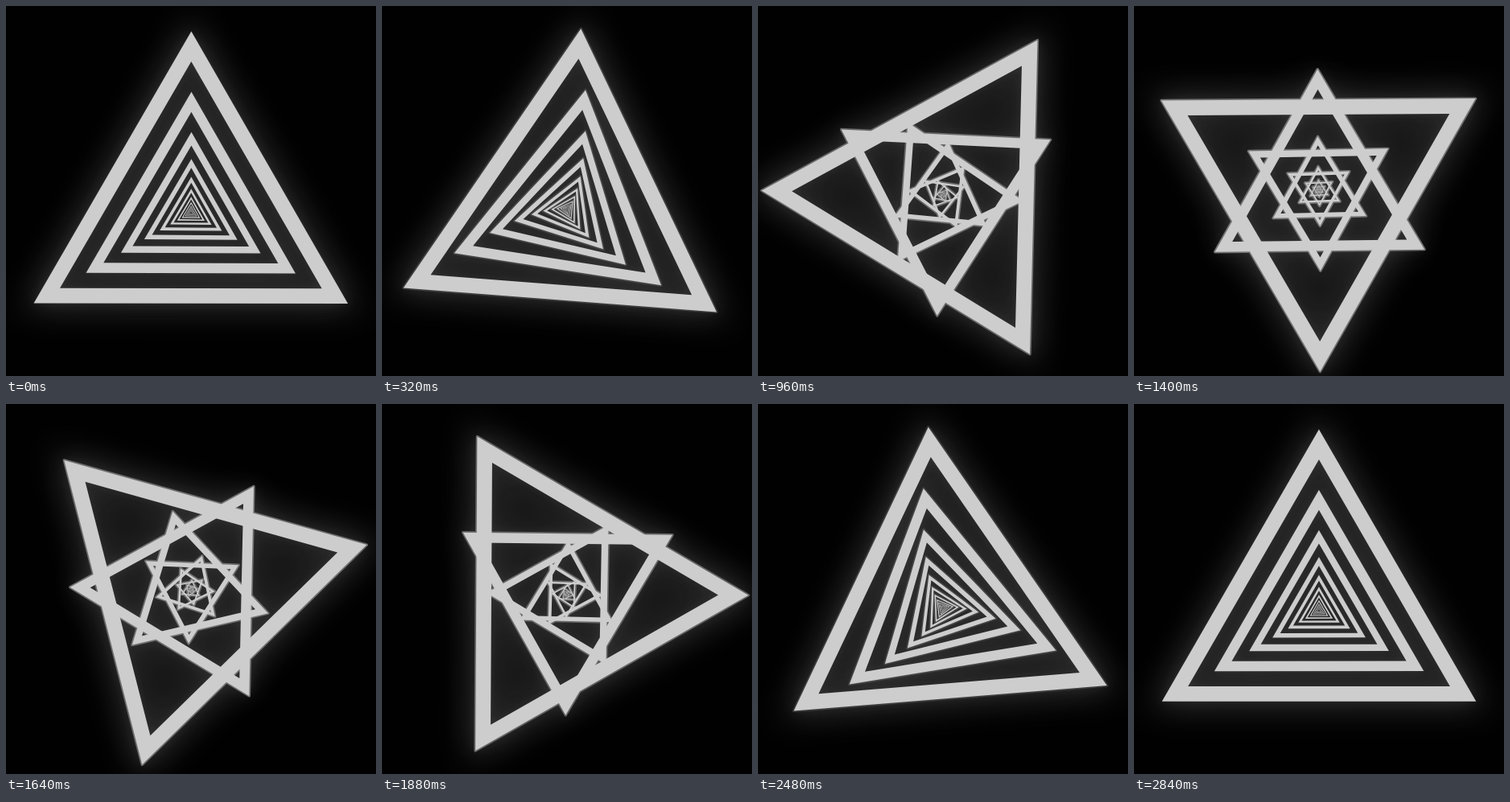
An HTML page that plays this animation: 460x460 px, repeating every 2.88 s.

```html
<!DOCTYPE html>
<html lang="en">
<head>
<meta charset="utf-8">
<title>Nested triangles</title>
<style>
  html, body { margin: 0; width: 100%; height: 100%; overflow: hidden; background: #010101; }
  svg { display: block; width: 100vw; height: 100vh; }
  #halo { fill: #cdcdcd; opacity: .09; }
  #rims { fill: none; stroke: #727272; stroke-width: 3.4; stroke-linejoin: round; }
  #rims path { vector-effect: non-scaling-stroke; }
  #bars { fill: #cdcdcd; fill-rule: evenodd; }
</style>
</head>
<body>
<svg viewBox="0 0 460 460">
  <defs>
    <filter id="soft" filterUnits="userSpaceOnUse" x="-80" y="-80" width="620" height="620"
            color-interpolation-filters="sRGB">
      <feGaussianBlur stdDeviation="19"/>
    </filter>
    <filter id="bloom" filterUnits="userSpaceOnUse" x="-40" y="-40" width="540" height="540"
            color-interpolation-filters="sRGB">
      <feGaussianBlur in="SourceGraphic" stdDeviation="23" result="wideBlur"/>
      <feComponentTransfer in="wideBlur" result="wide"><feFuncA type="linear" slope=".18"/></feComponentTransfer>
      <feGaussianBlur in="SourceGraphic" stdDeviation="7" result="nearBlur"/>
      <feComponentTransfer in="nearBlur" result="near"><feFuncA type="linear" slope=".1"/></feComponentTransfer>
      <feMerge>
        <feMergeNode in="wide"/>
        <feMergeNode in="near"/>
        <feMergeNode in="SourceGraphic"/>
      </feMerge>
    </filter>
  </defs>
  <g id="halo" filter="url(#soft)"></g>
  <g filter="url(#bloom)">
    <g id="rims"></g>
    <g id="bars"></g>
  </g>
</svg>
<script>
  const LOOP = 2880, STEP = 40;
  const COUNT = 13, RATIO = 2 / 3;
  const OUTER = 225.5, INNER = 188;

  const triangle = r => {
    const x = r * Math.sqrt(3) / 2;
    return `M0 ${-r}L${x} ${r / 2}L${-x} ${r / 2}Z`;
  };

  function addPaths(id, count, d) {
    const parent = document.getElementById(id);
    return Array.from({ length: count }, () => {
      const path = document.createElementNS('http://www.w3.org/2000/svg', 'path');
      path.setAttribute('d', d);
      return parent.appendChild(path);
    });
  }

  const layers = [
    addPaths('halo', 1, triangle(OUTER + 30)),
    addPaths('rims', COUNT, triangle(OUTER)),
    addPaths('bars', COUNT, triangle(OUTER) + triangle(INNER))
  ];
  const rims = document.getElementById('rims');

  // cubic-bezier(.39, 0, .61, 1), solved by bisection
  function ease(x) {
    let lo = 0, hi = 1, p = 0.5;
    for (let i = 0; i < 30; i++) {
      p = (lo + hi) / 2;
      const q = 1 - p;
      const at = 3 * 0.39 * p * q * q + 3 * 0.61 * p * p * q + p * p * p;
      if (at < x) lo = p; else hi = p;
    }
    return p * p * (3 - 2 * p);
  }

  function draw(time) {
    const t = Math.floor(time / STEP + 0.1) * STEP % LOOP;
    const angle = 120 * ease((t + 55) / 2920);
    const lift = Math.sin(Math.PI * (t + 30) / 2840) ** 2;
    rims.style.opacity = Math.sqrt(lift);
    for (const layer of layers) {
      layer.forEach((path, i) => path.setAttribute('transform',
        `translate(230 ${257 - 28 * lift}) scale(${RATIO ** i}) rotate(${angle * (i + 1)})`));
    }
  }

  const start = performance.now();
  function tick() {
    draw(performance.now() - start);
    requestAnimationFrame(tick);
  }
  tick();
</script>
</body>
</html>
```
